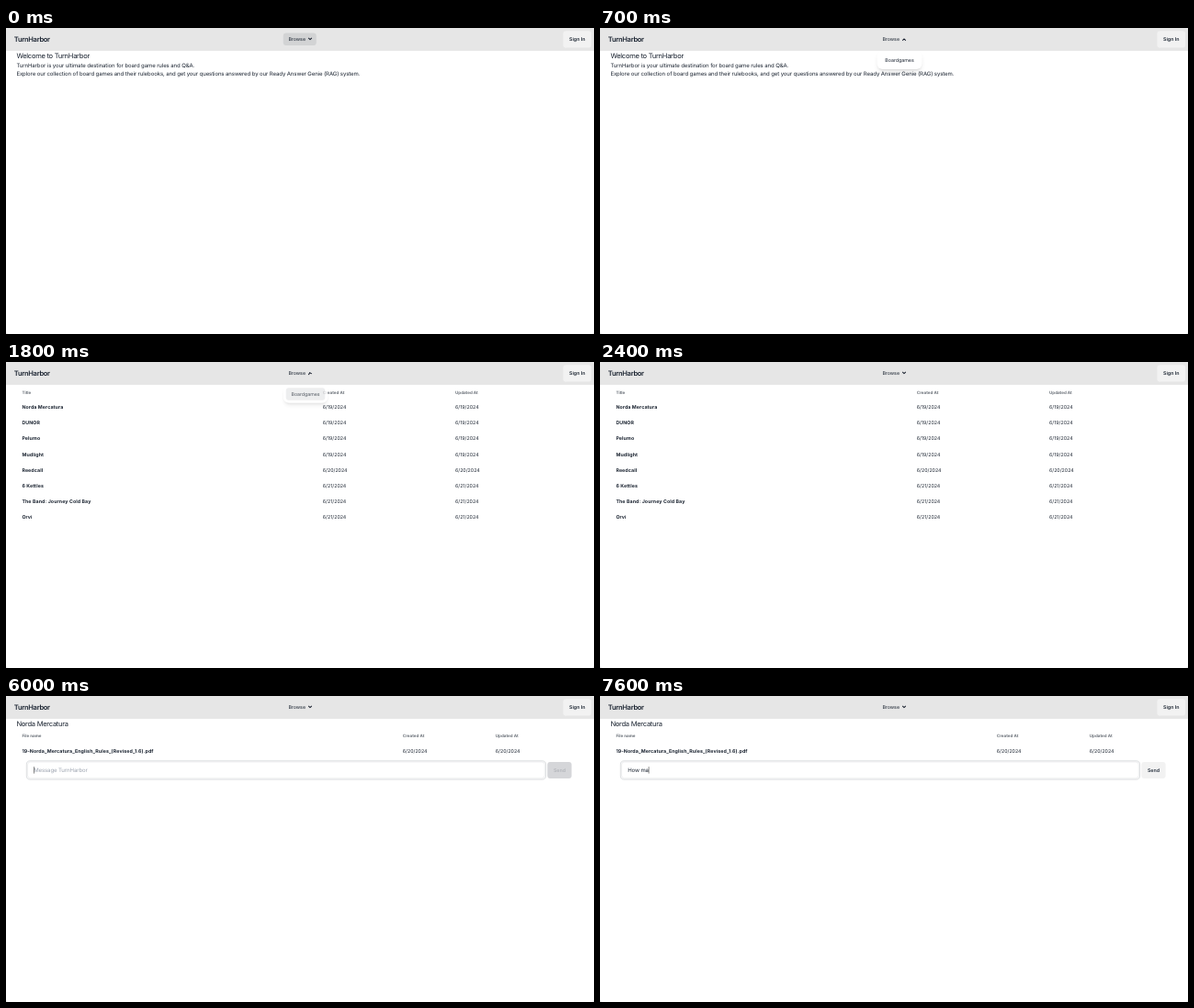
Write an HTML page that moves like this. It is 640 by 334 pixels and loops after 8000 ms.

```html
<!DOCTYPE html>
<html lang="en">
<head>
<meta charset="utf-8">
<title>TurnHarbor</title>
<style>
  html, body { margin: 0; width: 100%; height: 100%; overflow: hidden; background: #e8e8e8; }
  svg { display: block; width: 640px; height: 334px; background: #fff; border-radius: 3px; }
  text { font: 5.28px Inter, "Liberation Sans", sans-serif; fill: #1a2330; white-space: pre; text-rendering: geometricPrecision; }
  .body { font-size: 6.03px; letter-spacing: -.015em; }
  .title { font-size: 7.54px; letter-spacing: -.035em; }
  .logo { font-size: 7.54px; letter-spacing: -.04em; font-weight: 600; }
  .th { font-size: 4.52px; font-weight: 700; fill-opacity: .65; }
  .bold { font-weight: 700; letter-spacing: .018em; }
  .btn { font-weight: 600; text-anchor: middle; }
  .mid { text-anchor: middle; }
  .hover { fill: #1f2937; fill-opacity: .1; }
  .line { fill: none; stroke: #1f2937; stroke-opacity: .2; }
  #hint { fill: #9ca3af; }
</style>
</head>
<body>
<svg viewBox="0 0 640 334">
  <rect width="640" height="24.9" fill="#e6e6e6"/>
  <text class="logo" x="8.8" y="15">TurnHarbor</text>
  <rect x="606.4" y="3.3" width="30.7" height="18.1" rx="3" fill="#f2f2f2"/>
  <text class="btn" x="621.7" y="14.2">Sign In</text>
  <rect id="browseHover" class="hover" x="301.8" y="5.6" width="35.9" height="13.5" rx="3"/>
  <text x="307.4" y="14.2">Browse</text>
  <path id="chevron" d="M-1.5 1.05H1.05V-1.5" fill="none" stroke="#111827" stroke-width=".95"/>

  <g id="home">
    <text class="title" x="11.4" y="33.3">Welcome to TurnHarbor</text>
    <text class="body" x="11.4" y="42.9">TurnHarbor is your ultimate destination for board game rules and Q&amp;A.</text>
    <text class="body" x="11.4" y="52">Explore our collection of board games and their rulebooks, and get your questions answered by our Ready Answer Genie (RAG) system.</text>
  </g>

  <g id="list"></g>

  <g id="game">
    <text class="title" x="11.4" y="33.3">Norda Mercatura</text>
    <text class="th" x="17.4" y="44.9">File name</text>
    <text class="th" x="431.8" y="44.9">Created At</text>
    <text class="th" x="532.8" y="44.9">Updated At</text>
    <text class="bold" x="17.4" y="61.7">19-Norda_Mercatura_English_Rules_(Revised_1.6).pdf</text>
    <text x="431.8" y="61.7">6/20/2024</text>
    <text x="532.8" y="61.7">6/20/2024</text>
    <rect class="line" x="23.6" y="72" width="562.7" height="17.8" rx="2.9" stroke-width=".38"/>
    <rect id="focus" class="line" x="22.3" y="70.8" width="565.3" height="20.3" rx="4.1" stroke-width=".76"/>
    <text id="hint" class="body" x="30.2" y="83.1">Message TurnHarbor</text>
    <text id="typed" class="body" x="30.2" y="83.1"></text>
    <rect id="caret" y="77.2" width=".5" height="7.4" fill="#111"/>
    <rect id="send" x="589.3" y="71.9" width="26.3" height="18.1" rx="3"/>
    <text id="sendText" class="btn" x="602.4" y="82.9">Send</text>
  </g>

  <g id="menu">
    <rect x="302.6" y="30" width="46.8" height="17.5" rx="5" fill-opacity=".1" style="filter: blur(2.4px)"/>
    <rect x="302.9" y="28" width="46.2" height="17.6" rx="5" fill-opacity=".1" style="filter: blur(.9px)"/>
    <rect x="301.5" y="25.3" width="49" height="19.6" rx="6" fill="#fff"/>
    <rect id="itemHover" class="hover" x="304.5" y="28.3" width="43" height="13.6" rx="3"/>
    <text class="mid" x="326" y="37.1">Boardgames</text>
  </g>
</svg>
<script>
const $ = id => document.getElementById(id);
const set = (id, attrs) => { for (const k in attrs) $(id).setAttribute(k, attrs[k]); };
const show = (id, on) => set(id, { visibility: on ? 'visible' : 'hidden' });

const games = [
  ['Norda Mercatura', 19], ['DUNOR', 19], ['Pelumo', 19], ['Mudlight', 19],
  ['Reedcall', 20], ['6 Kettles', 21], ['The Band: Journey Cold Bay', 21], ['Orvi', 21]
];
const row = (y, cells, first, rest) => cells.map((s, i) =>
  `<text class="${i ? rest : first}" x="${[17.4, 344.8, 489][i]}" y="${y}">${s}</text>`).join('');
$('list').innerHTML = row(34.6, ['Title', 'Created At', 'Updated At'], 'th', 'th') +
  games.map(([name, day], i) => {
    const date = `6/${day}/2024`;
    return row(51.1 + 17.16 * i, [name, date, date], 'bold', '');
  }).join('');

// Standard ease cubic-bezier(.4, 0, .2, 1), solved by bisection
function ease(x) {
  if (x <= 0 || x >= 1) return x <= 0 ? 0 : 1;
  let lo = 0, hi = 1, u;
  for (let i = 0; i < 20; i++) {
    u = (lo + hi) / 2;
    const bx = 1.2 * u * (1 - u) ** 2 + .6 * u * u * (1 - u) + u ** 3;
    if (bx < x) lo = u; else hi = u;
  }
  return 3 * u * u * (1 - u) + u ** 3;
}
const ramp = (t, start, dur) => ease((t - start) / dur);
const mix = (a, b, p) => `rgb(${a.map((v, i) => v + (b[i] - v) * p)})`;

const message = 'How ma', keyTimes = [7100, 7200, 7300, 7400, 7600, 7600];

function draw(t) {
  show('home', t < 1800);
  show('list', t >= 1800 && t < 4400);
  show('game', t >= 4400);

  const turn = ramp(t, 255, 300) - ramp(t, 1750, 300);
  set('chevron', { transform: `translate(331 ${11.2 + 2.1 * turn}) rotate(${45 + 180 * turn})` });
  set('browseHover', { opacity: 1 - ramp(t, 500, 200) });

  const open = ramp(t, 150, 200) - ramp(t, 1750, 200), size = .95 + .05 * open;
  set('menu', { opacity: open, transform: `translate(326 25.3) scale(${size}) translate(-326 -25.3)` });
  set('itemHover', { opacity: ramp(t, 1000, 200) });

  if (t < 4400) {
    ['focus', 'hint', 'typed', 'caret'].forEach(id => show(id, false));
    return;
  }
  const count = keyTimes.filter(k => t >= k).length;
  $('typed').textContent = message.slice(0, count);
  show('typed', true);
  show('hint', !count);
  show('focus', t >= 6000);
  show('caret', t >= 6000 && (t < 6500 || t >= 7000));
  set('caret', { x: 30.1 + (count ? $('typed').getComputedTextLength() : 0) });

  const ready = ramp(t, 7050, 200);
  set('send', { fill: mix([213, 214, 217], [242, 242, 242], ready) });
  $('sendText').style.fill = mix([177, 180, 185], [31, 41, 55], ready);
}

function frame() {
  draw(performance.now() % 8000);
  requestAnimationFrame(frame);
}
frame();
</script>
</body>
</html>
```
